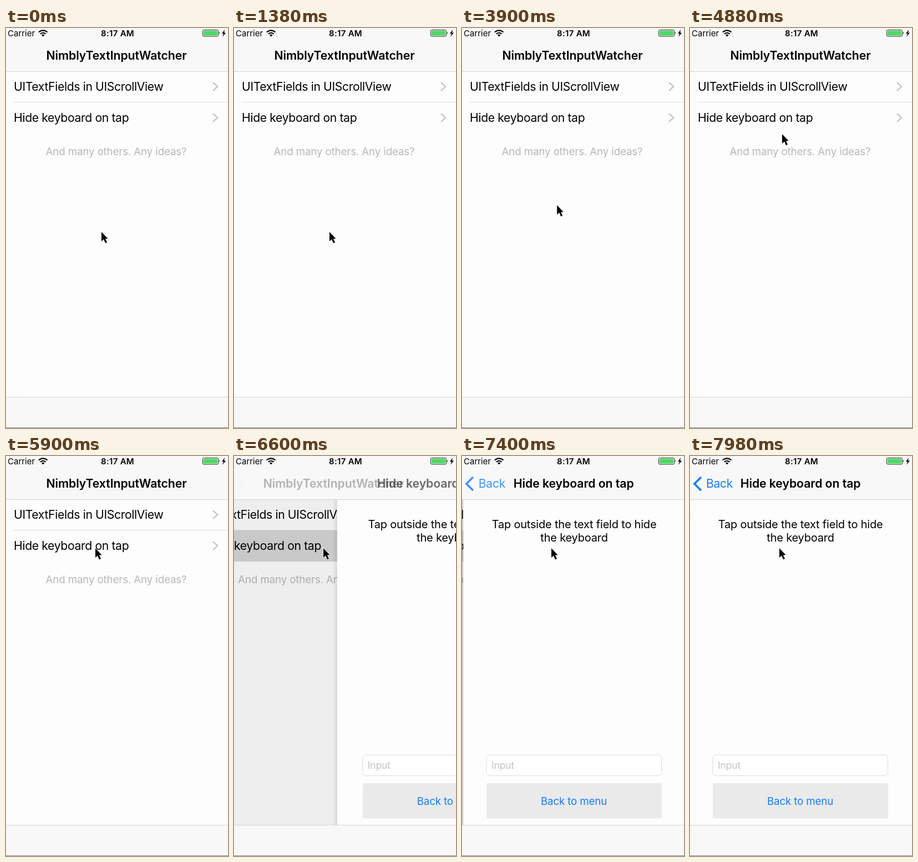
Recreate the animation shown at these times as an HTML page. Size 400 by 720 pixels, loop 8000 ms.

```html
<!DOCTYPE html>
<html lang="en">
<head>
<meta charset="utf-8">
<title>Keyboard demo</title>
<style>
  html, body { margin: 0; height: 100%; overflow: hidden; background: #fdfdfd; }
  svg { display: block; width: 100%; height: 100%; }
  text { font: 400 21.25px Inter, "Open Sans", sans-serif; letter-spacing: -.019em; }
  .title { font-weight: 600; text-anchor: middle; letter-spacing: -.004em; }
  .mid { text-anchor: middle; }
  .tap { font-size: 20px; letter-spacing: -.01em; }
  .note { font-size: 18.75px; letter-spacing: -.008em; }
  .field { font-size: 17.5px; letter-spacing: -.01em; }
  .status { font-size: 15px; letter-spacing: 0; }
  .blue { fill: #157efb; }
  .bar { fill: #f8f8f8; }
  .line { stroke: #d4d4d6; }
  .chev { fill: none; stroke: #c7c7cc; stroke-width: 2.4; }
</style>
</head>
<body>
<svg viewBox="0 0 400 720">
  <defs>
    <linearGradient id="shade">
      <stop offset="0" stop-color="#000" stop-opacity="0"/>
      <stop offset="1" stop-color="#000" stop-opacity=".1"/>
    </linearGradient>
  </defs>
  <rect width="400" height="720" fill="#fdfdfd"/>

  <g id="list">
    <rect id="pressed" y="134" width="400" height="56" fill="#d6d6d6"/>
    <path class="line" d="M14 133.5H400" stroke-opacity=".7"/>
    <text x="14" y="113">UITextFields in UIScrollView</text>
    <text x="14" y="169">Hide keyboard on tap</text>
    <path class="chev" d="M373 98l8 7.500-8 7.500M373 154l8 7.500-8 7.500"/>
    <text class="note mid" x="198.500" y="229" fill="#b8b8b8">And many others. Any ideas?</text>
  </g>
  <rect id="dim" y="78" width="400" height="586"/>

  <g id="page">
    <rect x="-8" y="78" width="8" height="586" fill="url(#shade)"/>
    <rect y="78" width="410" height="586" fill="#fdfdfd"/>
    <g id="content">
      <text class="tap mid" x="199" y="130">Tap outside the text field to hide</text>
      <text class="tap mid" x="199" y="154">the keyboard</text>
      <rect x="41" y="538" width="315.500" height="37.500" rx="6" fill="#fff" stroke="#dcdcdc"/>
      <text class="field" x="50" y="562.500" fill="#c4c4c9">Input</text>
      <rect x="41" y="589" width="316" height="63" fill="#eaeaea"/>
      <text class="note mid blue" x="198.500" y="627.500">Back to menu</text>
    </g>
  </g>

  <rect class="bar" width="400" height="78"/>
  <rect class="bar" y="664" width="400" height="56"/>
  <path class="line" d="M0 78.500H400M0 664.500H400"/>
  <path d="M0 719.500H400" stroke="#858585"/>

  <text id="home" class="title" x="199" y="57">NimblyTextInputWatcher</text>
  <text id="detail" class="title" x="199" y="57">Hide keyboard on tap</text>
  <g id="back">
    <path d="M20 38L8 50l12 12" fill="none" stroke="#157efb" stroke-width="3.6"/>
    <text id="backText" class="blue" x="29" y="57">Back</text>
  </g>

  <text class="status" x="3" y="15">Carrier</text>
  <path d="M59 7.500a11 11 0 0 1 15.500 0M62 10.700a6.800 6.800 0 0 1 9.500 0"
        fill="none" stroke="#000" stroke-width="2.2"/>
  <path d="M66.750 15.500l-2.600-2.700a3.700 3.700 0 0 1 5.200 0z"/>
  <text class="status mid" x="201" y="15" style="font-weight:600;letter-spacing:.3px">8:17 AM</text>
  <rect x="354.500" y="3.500" width="28" height="11.500" rx="2" fill="none" stroke="#222"/>
  <rect x="356" y="5" width="25" height="8.500" rx="1" fill="#4cd964"/>
  <path d="M384 7q2 2 0 4.500z"/>
  <path d="M394 3l-5 7h3l-2 6 6-7.500h-3z"/>

  <path id="cursor" d="M0 0V17l4-3.700 3 7 3-1.400-3-6.600H11.700z"
        stroke="#fff" stroke-width="1.6" paint-order="stroke"/>
</svg>
<script>
const LOOP = 8000, PRESS = 6250, PUSH = 6336, RATE = 6.77 / 1000;
const trail = [
  [3700, 172, 367], [4220, 170, 243], [4700, 166, 191],
  [4880, 166, 191], [5500, 161, 166]
];
const el = id => document.getElementById(id);
const move = (id, x, y = 0) => el(id).setAttribute('transform', `translate(${x} ${y})`);
const fade = (id, a) => el(id).setAttribute('opacity', a);
const clamp = v => Math.max(0, Math.min(1, v));

function pointer(t) {
  let [, x, y] = trail[0];
  for (let i = 1; i < trail.length; i++) {
    const [t0, x0, y0] = trail[i - 1], [t1, x1, y1] = trail[i];
    if (t < t0) break;
    const k = clamp((t - t0) / (t1 - t0));
    x = x0 + (x1 - x0) * k;
    y = y0 + (y1 - y0) * k;
  }
  return [x, y];
}

function draw(t) {
  move('cursor', ...pointer(t));
  fade('pressed', t >= PRESS ? 1 : 0);

  // Critically damped slide of the pushed page
  const s = Math.max(0, t - PUSH) * RATE;
  const left = (1 + s) * Math.exp(-s);
  const done = 1 - left;
  const edge = 400 * left;

  move('page', t < PUSH ? 420 : edge);
  move('content', 5 * clamp(edge / 20));
  move('list', -120 * done);
  fade('dim', .11 * done);

  move('home', -37 * done);
  fade('home', left * (1 - .4 * clamp(done * 2)));
  move('detail', .9 * edge);
  fade('detail', clamp(done * 1.06));
  move('backText', .36 * edge);
  fade('back', clamp((t - 6500) / 1000) ** 2);
}

function tick(now) {
  draw(now % LOOP);
  requestAnimationFrame(tick);
}
draw(0);
requestAnimationFrame(tick);
</script>
</body>
</html>
```
